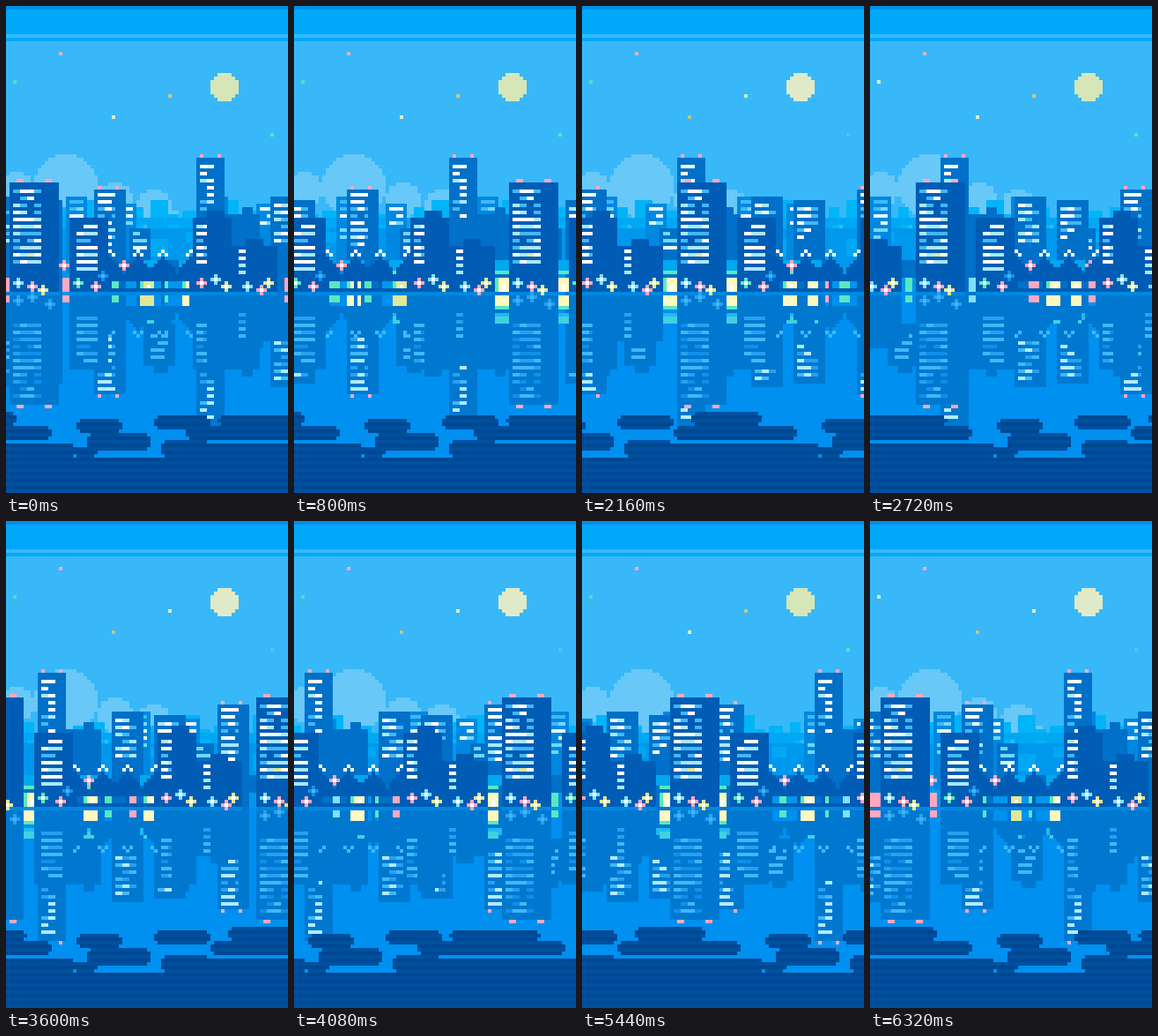
An HTML page with a canvas for the animation above (6400 ms loop, 320x552 px).

```html
<!DOCTYPE html>
<html lang="en">
<head>
<meta charset="utf-8">
<title>Night city</title>
<style>
html, body { margin: 0; width: 320px; height: 552px; overflow: hidden; background: #38b8f8; }
canvas { display: block; }
</style>
</head>
<body>
<canvas id="stage" width="320" height="552"></canvas>
<script>
const g = document.getElementById('stage').getContext('2d');
const STEP = 80, COUNT = 80, CELL = 4;
const INK = {
  sky: '#38b8f8', top: '#00a8fc', cloud: '#68c8f8', haze: '#00a8f4', far: '#00b4f8',
  low: '#0098ec', back: '#0088e0', mid: '#0070c8', front: '#005cb4',
  water: '#0090f0', mirror: '#0078d0', wave: '#0050a0', deep: '#004892',
  pink: '#ffa8c0', green: '#58e8c0', gold: '#fff8c0', lemon: '#e0e898',
  aqua: '#80e0ff', white: '#ffffff', dim: '#40b8f8'
};

// x, width, top, window x, window width, first row, last row, roof lamps
const FRONT = [
  [4, 56, 200, 8, 32, 208, 292, [[12, 8], [44, 8]]],
  [72, 44, 240, 80, 24, 248, 300],
  [212, 44, 240, 216, 24, 248, 292],
  [228, 20, 232],
  [256, 52, 272, 264, 24, 276, 304],
  [272, 20, 264]
];
const MIDDLE = [
  [300, 36, 216, 304, 24, 224, 264],
  [28, 36, 220, 32, 24, 228, 264],
  [248, 40, 236],
  [268, 12, 228],
  [216, 32, 172, 220, 16, 180, 240, [[220, 4], [240, 4]]],
  [100, 36, 208, 104, 20, 212, 268, [[104, 4], [124, 4]]]
];
const BACK = [
  [68, 24, 216, 72, 16, 220, 260],
  [124, 24, 224, 128, 16, 228, 244],
  [140, 24, 252, 144, 16, 256, 276]
];
const FAR = [[4, 20, 220], [40, 16, 232], [24, 12, 236], [64, 12, 228]];

// lit street fronts: x, width, colour
const SHOPS = [
  [16, 16, 'gold'], [40, 16, 'gold'], [64, 8, 'pink'], [80, 12, 'green'], [100, 16, 'gold'],
  [120, 8, 'green'], [152, 16, 'lemon'], [176, 8, 'green'], [200, 16, 'gold'], [224, 8, 'green'],
  [248, 8, 'aqua'], [268, 16, 'gold'], [292, 8, 'green'], [316, 12, 'pink']
];
const FLOWERS = [
  [14, 314, 'aqua'], [30, 318, 'pink'], [42, 322, 'lemon'], [82, 314, 'green'], [102, 318, 'pink'],
  [134, 294, 'pink'], [222, 314, 'pink'], [238, 310, 'aqua'], [250, 318, 'lemon'],
  [274, 318, 'aqua'], [290, 322, 'pink'], [298, 314, 'lemon']
];
// x0, x1, y0, y1 on a strip 640 wide
const WAVES = [
  [80, 132, 468, 484], [92, 164, 484, 504], [76, 104, 500, 512], [168, 232, 464, 480],
  [240, 344, 464, 476], [204, 372, 476, 492], [176, 232, 492, 504], [176, 400, 496, 512],
  [400, 452, 468, 484], [412, 484, 484, 504], [396, 424, 500, 512], [488, 552, 464, 480],
  [572, 652, 460, 476], [552, 692, 476, 492], [496, 552, 492, 504], [496, 720, 496, 512]
];

const mod = (a, b) => ((a % b) + b) % b;
const noise = (a, b, c) => mod(Math.sin(a * 12.9898 + b * 78.233 + c * 37.719) * 43758.5453, 1);

function box(x, y, w, h, color) {
  g.fillStyle = color;
  g.fillRect(x, y, w, h);
}

function tiled(shift, period, draw) {
  const start = mod(shift, period);
  for (let x = start - 2 * period; x < 320; x += period) {
    if (x + 2 * period <= 0) continue;
    g.save();
    g.translate(x, 0);
    draw();
    g.restore();
  }
}

function flipped(axis, draw) {
  g.save();
  g.translate(0, axis);
  g.scale(1, -1);
  draw();
  g.restore();
}

function disc(cx, cy, r, color, bottom = 552) {
  for (let y = cy - r; y < Math.min(cy + r, bottom); y += CELL) {
    const dy = y + 2 - cy;
    const half = Math.round(Math.sqrt(Math.max(0, r * r - dy * dy)) / CELL) * CELL;
    box(cx - half, y, half * 2, CELL, color);
  }
}

function plus(x, y, arm, core) {
  box(x - 6, y - 2, 12, 4, arm);
  box(x - 2, y - 6, 4, 12, arm);
  box(x - 2, y - 2, 4, 4, core);
}

function panes(b, tones) {
  const [x0, , , wx, ww, first, last] = b;
  if (!ww) return;
  for (let y = first; y <= last; y += 8) {
    for (let x = 0; x < ww; x += CELL) {
      const r = noise(x0, y, Math.floor(x / 8));
      const fade = (y - first) / (last - first + 40);
      if (r < 0.2) continue;
      box(wx + x, y, 4, 4, tones[r > 0.5 + fade * 0.35 ? 0 : r > 0.36 ? 1 : 2]);
    }
  }
}

function tower(b, body, base, tones) {
  box(b[0], b[2], b[1], base - b[2], body);
  panes(b, tones);
  for (const [x, w] of b[7] || []) box(x, b[2] - 4, w, 4, INK.pink);
}

const LIT = [INK.white, '#a8e8ff', INK.dim];

function sky(n) {
  const even = n % 2 === 0;
  box(0, 0, 320, 552, INK.sky);
  box(0, 0, 320, 32, INK.top);
  box(0, 0, 320, 4, '#0090e8');
  box(0, 36, 320, 4, INK.top);
  disc(248, 92, 16, even ? '#d6e6b8' : '#dfebc8');
  disc(68, 204, 36, INK.cloud, 240);
  disc(12, 208, 20, INK.cloud, 240);
  disc(124, 220, 20, INK.cloud, 240);
  disc(168, 228, 20, INK.cloud, 240);
  box(184, 232, 12, 8, INK.cloud);
  const star = (x, y, color) => box(x, y, 4, 4, color);
  star(60, 52, n % 8 === 6 ? INK.lemon : INK.pink);
  star(8, 84, n % 40 > 31 ? '#d8f0b8' : '#50e0c0');
  star(184, 100, even ? '#c8c888' : '#d8f0c0');
  star(120, 124, even ? '#d8f0c0' : '#b8c888');
  star(300, 144, even ? '#50e8c0' : '#48cce0');
}

function skyline(n) {
  tiled(-4 * Math.floor(n / 4), 80, () => {
    for (const [x, w, y] of FAR) box(x, y, w, 304 - y, INK.far);
  });
  box(0, 240, 320, 8, INK.haze);
  tiled(-4 * Math.floor(n / 4), 80, () => {
    box(0, 248, 24, 4, INK.haze);
    box(36, 248, 32, 4, INK.haze);
  });
  box(0, 252, 320, 72, INK.low);
  tiled(-4 * Math.floor(n / 4), 80, () => {
    box(4, 264, 20, 20, INK.haze);
    box(44, 256, 16, 12, INK.haze);
  });
  tiled(-4 * Math.floor(n / 2), 160, () => {
    for (const b of BACK) tower(b, b[2] > 240 ? INK.mid : INK.back, 304, ['#e0f8ff', '#70d8ff', INK.dim]);
  });
}

function shopGlow() {
  for (const [x, w, c] of SHOPS) {
    if (w === 16) {
      box(x - 4, 288, w + 8, 12, '#00a8f0');
      box(x, 300, w, 4, INK.green);
    }
    box(x, 308, w, 16, INK[c]);
    if (w === 16) {
      box(x, 308, 4, 16, INK.green);
      box(x + 8, 316, 4, 8, INK.white);
    }
  }
}

function bridge(body, lamps) {
  box(116, 304, 96, 8, body);
  for (const x of [116, 148, 176, 208]) {
    box(x, 284, 4, 40, body);
    box(x, 276, 4, 4, lamps);
    if (x > 116) box(x - 4, 280, 4, 4, lamps);
    if (x < 208) box(x + 4, 280, 4, 4, lamps);
    for (let i = 0; i < 3; i++) {
      if (x < 208) box(x + 4 + i * 4, 288 + i * 4, 4, 16 - i * 4, body);
      if (x > 116) box(x - 4 - i * 4, 288 + i * 4, 4, 16 - i * 4, body);
    }
  }
}

function city(n) {
  tiled(-4 * n, 320, () => {
    for (const b of MIDDLE) tower(b, INK.mid, 324, LIT);
    box(116, 288, 180, 20, INK.mid);
    shopGlow();
    plus(66, 294, INK.pink, INK.white);
  });
  tiled(-8 * n, 320, () => {
    for (const b of FRONT) tower(b, INK.front, 324, LIT);
    box(24, 280, 8, 4, INK.lemon);
    bridge(INK.front, INK.white);
    box(116, 320, 96, 4, INK.front);
  });
}

function water(n) {
  box(0, 324, 320, 188, INK.water);
  tiled(-4 * n, 320, () => {
    flipped(648, () => {
      for (const b of MIDDLE) tower(b, INK.mirror, 324, ['#b0ecff', INK.dim, '#28a0f0']);
      box(156, 240, 36, 48, INK.mirror);
      box(168, 232, 16, 8, INK.mirror);
      panes([156, 36, 240, 164, 20, 248, 272], [INK.dim, '#28a0f0', INK.dim]);
    });
    for (const [x, w, c] of SHOPS) {
      box(x, 328, w, w === 16 ? 12 : 8, INK[c]);
      if (w === 16) {
        box(x, 340, w, 4, INK.green);
        box(x - 4, 348, w + 8, 8, '#20b8f0');
        box(x, 352, w, 8, '#40d0e0');
      }
    }
  });
  tiled(-8 * n, 320, () => {
    flipped(652, () => {
      for (const b of FRONT) tower(b, INK.mirror, 324, [INK.dim, '#28a0f0', '#1090e8']);
      bridge(INK.mirror, INK.dim);
    });
    box(4, 324, 56, 4, INK.back);
    box(72, 324, 236, 4, INK.back);
    plus(14, 334, '#28a0f0', INK.dim);
    plus(30, 330, '#28a0f0', INK.dim);
    plus(50, 338, '#28a0f0', INK.dim);
    plus(110, 306, '#1890e8', INK.dim);
    for (const [x, y, c] of FLOWERS) plus(x, y, INK[c], INK.white);
  });
}

function slab([x0, x1, y0, y1]) {
  for (let y = y0; y < y1; y += CELL) {
    const inset = y === y0 || y === y1 - CELL ? 4 : 0;
    box(x0 + inset, y, x1 - x0 - inset * 2, CELL, y / CELL % 2 ? INK.wave : INK.deep);
  }
}

function waves(n) {
  tiled(-64 * n, 640, () => {
    WAVES.forEach(slab);
    box(576, 492, 52, 4, INK.water);
  });
  for (let y = 512; y < 552; y += CELL) {
    box(0, y, 320, CELL, y / CELL % 2 ? INK.wave : INK.deep);
  }
}

function draw(now) {
  const n = Math.floor(now / STEP) % COUNT;
  sky(n);
  skyline(n);
  city(n);
  water(n);
  waves(n);
}

let start = null;
function tick(now) {
  if (start === null) start = now;
  draw(now - start);
  requestAnimationFrame(tick);
}
draw(0);
requestAnimationFrame(tick);
</script>
</body>
</html>
```
